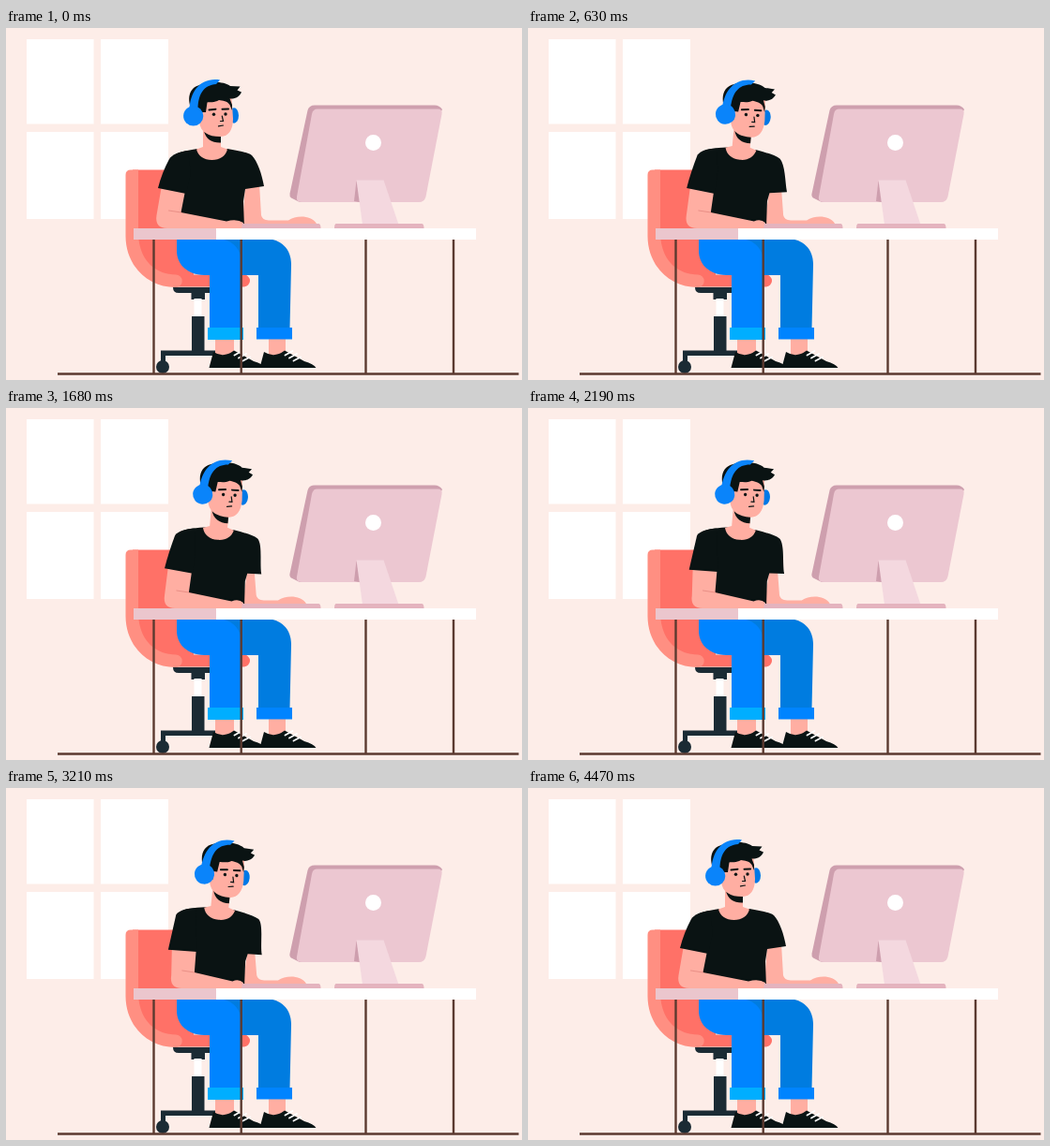
These frames come from a looping animation (550 px wide and 376 px high, 4.5 s). An HTML page:

```html
<!DOCTYPE html>
<html lang="en">
<head>
<meta charset="utf-8">
<title>At the desk</title>
<style>
html, body { margin: 0; width: 100%; height: 100%; overflow: hidden; background: #fdede8; }
svg { display: block; width: 550px; height: 376px; }
.line { fill: none; stroke-linecap: round; }
</style>
</head>
<body>
<svg viewBox="0 0 550 376" xmlns="http://www.w3.org/2000/svg">
  <rect width="550" height="376" fill="#fdede8"/>
  <path fill="#fff" d="M22 12H93.500V102.500H22ZM101 12H173V102.500H101ZM22 111H93.500V204H22ZM101 111H173V204H101Z"/>

  <!-- chair -->
  <path fill="#ff7167" d="M135 151.500H200V263.500H253.500A6.300 6.300 0 0 1 253.500 276.500H180C155 274 138 250 138 222Z"/>
  <path fill="#ff8f82" d="M127.500 157Q127.500 151.500 133 151.500H141V218C141 246 157 263 181 263.500A6.700 6.700 0 0 1 181 277C150 277 127.500 253 127.500 222Z"/>
  <g fill="#1b2b34">
    <path d="M178 277H218V283H184Q178 283 178 277Z"/>
    <path d="M197.500 282H212V290H197.500ZM198 308H211.500V346H198ZM165 344.500H228V350H170V357H165Z"/>
    <circle cx="167" cy="362" r="7"/>
  </g>
  <path fill="#fff" d="M200.500 289H208.500V308H200.500Z"/>

  <!-- legs -->
  <path fill="#ffaea2" d="M280 331H298V349H280ZM223 331H243V349H223Z"/>
  <path fill="#007ce0" d="M220 225H276C294 225 304.500 237 304 253L302.500 321H269V264H225Z"/>
  <path fill="#0084ff" d="M182 225H224C242 225 251.500 237 251.500 253V321H217V264H212C193 264 182 252 182 238Z"/>
  <path fill="#00aeff" d="M215 320H253V333H215Z"/>
  <path fill="#0084ff" d="M267 320H305V332.500H267Z"/>
  <g id="shoe">
    <path fill="#0a1414" d="M216.500 363L221 346Q232 353 243 344.500L264 356Q274 359 276.500 363Z"/>
    <path class="line" stroke="#fff" stroke-width="1.800" d="M243.500 349.500L251.500 345M248 352.500L256 348M252.500 355.500L260 351.500"/>
  </g>
  <use href="#shoe" x="54"/>

  <!-- monitor -->
  <path fill="#ce9fae" d="M329 82.500H457Q462 82.500 465 87L458 100L330 186H313L304 181.500Q302 180 302.500 177L321.500 88Q323 82.500 329 82.500Z"/>
  <path fill="#ecc7d1" d="M332 86.500H460Q465.500 86.500 464.500 92L447.500 180Q446 186 440 186H315Q309 186 310 180L326 92Q327 86.500 332 86.500Z"/>
  <path fill="#ce9fae" d="M373.500 163L371 185L382 187Z"/>
  <path fill="#f4d8df" d="M373.500 162.500H402.500L418.500 210H380Z"/>
  <circle cx="391.500" cy="122.500" r="8.500" fill="#fff"/>

  <!-- person -->
  <path id="farArm" fill="#ffaea2"/>
  <path id="shirt" fill="#0a1313"/>
  <g id="upper">
    <path fill="#ffaea2" d="M203 129.500L210 127V105H229V127L236 129.500C234 137 228 141 219.500 141S205 137 203 129.500Z"/>
    <path fill="#0a1313" d="M211 110L229 113V122.500C220 123 213 119 211 110Z"/>
    <ellipse cx="243" cy="93.500" rx="5" ry="8.300" fill="#0078e6"/>
    <path fill="#ffaea2" d="M206 74H240.500L242 97C242 109 237 115.800 229 116C217 116.300 207 112 206 100Z"/>
    <path fill="#0a1313" d="M199 90C192 76 195 64 206 61C216 56 233 57 239 62L249.500 62.500L246.500 66.500L251 68.500C248 75 242 76 238.500 75.500L241 82V88L238.500 82C236 78 231 77.500 227 77C222 80 217 79 214.500 79.500L213 90H209V99Z"/>
    <path fill="#0a84fa" d="M195.500 88C196 67 208 52.500 228 55.500L224 60C211 61 204.500 70 204.500 88Z"/>
    <circle cx="199.700" cy="94" r="10.600" fill="#0a84fa"/>
    <g class="line" stroke="#0a1313">
      <path stroke-width="2" d="M216.500 87.500L223.500 86.700M230.500 86.700L237 86.500"/>
      <path stroke-width="1.200" d="M230.300 94L231.500 99.500H228.500M226.500 104.800L231.500 104"/>
    </g>
    <g fill="#0a1313"><circle cx="221.500" cy="92.300" r="1.700"/><circle cx="234" cy="92" r="1.700"/></g>
  </g>
  <path id="nearArm" fill="#ffaea2"/>
  <path id="crease" class="line" stroke="#e98f86" stroke-width="1"/>
  <path id="sleeve" fill="#0a1313"/>

  <!-- desk -->
  <path fill="#e4b3be" d="M252 209H333Q335.500 209 335.500 214H251ZM352 209H443Q445.500 209 445.500 214H350Q350 209 352 209Z"/>
  <path fill="#fff" d="M224 214H501V226H224Z"/>
  <path fill="#ebc6cd" d="M136 214H224V226H136Z"/>
  <path fill="none" stroke="#5b3a30" stroke-width="2.400" d="M157.500 226V369M250.700 226V369M383.500 226V369M477 226V369M55 369.500H546.500"/>
</svg>
<script>
const LOOP = 4500, TILT = 5.4, PIVOT = [225, 210];
const el = id => document.getElementById(id);

// [time, value] pairs
const leanKeys = [[0, 0], [400, .05], [540, .24], [630, .98], [720, 1], [1110, .94], [1680, .91],
  [2700, .91], [3210, 1.07], [3780, .08], [4320, 0], [4500, 0]];
const swingKeys = [[0, 0], [1200, 0], [1680, .04], [2160, .3], [2700, 1], [3210, .33], [3780, .04], [4320, 0], [4500, 0]];
const reachKeys = [[0, 1], [540, .98], [630, .65], [800, .25], [1110, .08], [1680, 0], [2160, .15],
  [2700, .4], [3210, 0], [3780, -.04], [4320, .95], [4500, 1]];

// Cubic through the keys, flat at peaks so that it never overshoots
function curve(keys, t) {
  let i = 0;
  while (i < keys.length - 2 && t >= keys[i + 1][0]) i++;
  const slope = k => k < 0 || k > keys.length - 2 ? 0
    : (keys[k + 1][1] - keys[k][1]) / (keys[k + 1][0] - keys[k][0]);
  const tangent = k => {
    const a = slope(k - 1), b = slope(k);
    return a * b > 0 ? 2 * a * b / (a + b) : 0;
  };
  const [t0, v0] = keys[i], [t1, v1] = keys[i + 1];
  const h = t1 - t0, u = (t - t0) / h, w = 1 - u;
  return v0 * w * w * (1 + 2 * u) + v1 * u * u * (3 - 2 * u)
    + h * u * w * (w * tangent(i) - u * tangent(i + 1));
}

function draw(t) {
  const lean = curve(leanKeys, t), swing = curve(swingKeys, t), reach = curve(reachKeys, t);
  const angle = lean * TILT * Math.PI / 180, c = Math.cos(angle), s = Math.sin(angle);
  const pt = (x, y) => x.toFixed(2) + ' ' + y.toFixed(2) + ' ';
  const body = (x, y) => {
    const dx = x - PIVOT[0], dy = y - PIVOT[1];
    return pt(PIVOT[0] + dx * c - dy * s, PIVOT[1] + dx * s + dy * c);
  };
  const set = (id, d) => el(id).setAttribute('d', d);

  el('upper').setAttribute('transform', `rotate(${lean * TILT} ${PIVOT})`);

  // far arm
  const cuffX = 269.5 + 5.5 * reach + 3 * lean, cuffY = 173 + 5 * lean - 4 * reach;
  const innerX = 255 + 2.5 * lean, innerY = 173 + 4 * lean - reach;
  const armX = 262 + 8 * reach + 3 * lean, tip = 320 + 11 * reach;
  set('farArm', 'M' + pt(innerX, innerY - 4) + 'L' + pt(armX, cuffY - 3)
    + 'L' + pt(armX + 2, 200) + 'Q' + pt(armX + 3, 205) + pt(armX + 10, 205.5)
    + 'L' + pt(tip - 30, 205.5) + 'C' + pt(tip - 22, 200) + pt(tip - 6, 199.5) + pt(tip, 209)
    + 'L' + pt(tip, 211) + 'L252 211Z');

  // torso with far sleeve
  set('shirt', 'M' + body(204, 129) + 'C' + body(192, 131) + body(183, 132) + body(177, 138)
    + 'L' + body(177, 165) + 'L' + pt(181 + 3 * lean, 180) + 'L185 213L254 213L'
    + pt(253 + 2 * lean, 185) + 'L' + pt(innerX, innerY)
    + 'L' + pt(cuffX, cuffY) + 'C' + pt(cuffX - 2, cuffY - 12) + body(268, 142) + body(262, 136)
    + 'C' + body(256, 132) + body(246, 131) + body(236, 129) + 'Z');

  // near arm
  const outX = 162 + 7.3 * lean + 9.3 * swing, outY = 171 + 5 * swing;
  const inX = 192 + 7.3 * lean + 12 * swing, inY = 177 - 6 * swing;
  const elbow = 160 + 8.5 * lean + 20 * swing;
  const crookX = 186.5 + 8.5 * lean + 16 * swing;
  const handX = 235 + 6 * lean;
  set('nearArm', 'M' + pt(outX + 4, outY - 3) + 'L' + pt(elbow + .5, 200)
    + 'C' + pt(elbow - 1, 209) + pt(elbow + 3, 214) + pt(elbow + 12, 214)
    + 'L253 214L253 208Q' + pt(246 + 2 * lean, 203.5) + pt(handX, 206.5)
    + 'L' + pt(crookX, 197) + 'L' + pt(inX - 1, inY - 3) + 'Z');
  set('crease', 'M' + pt(crookX - 13, 195) + 'L' + pt(crookX, 197));
  set('sleeve', 'M' + body(194, 131) + 'C' + body(185, 132) + body(177, 135) + body(174, 140)
    + 'Q' + pt(outX + 4, 155) + pt(outX, outY) + 'L' + pt(inX, inY)
    + 'L' + body(197, 155) + 'Z');
}

const start = performance.now();
function tick() {
  draw((performance.now() - start) % LOOP);
  requestAnimationFrame(tick);
}
draw(0);
requestAnimationFrame(tick);
</script>
</body>
</html>
```
